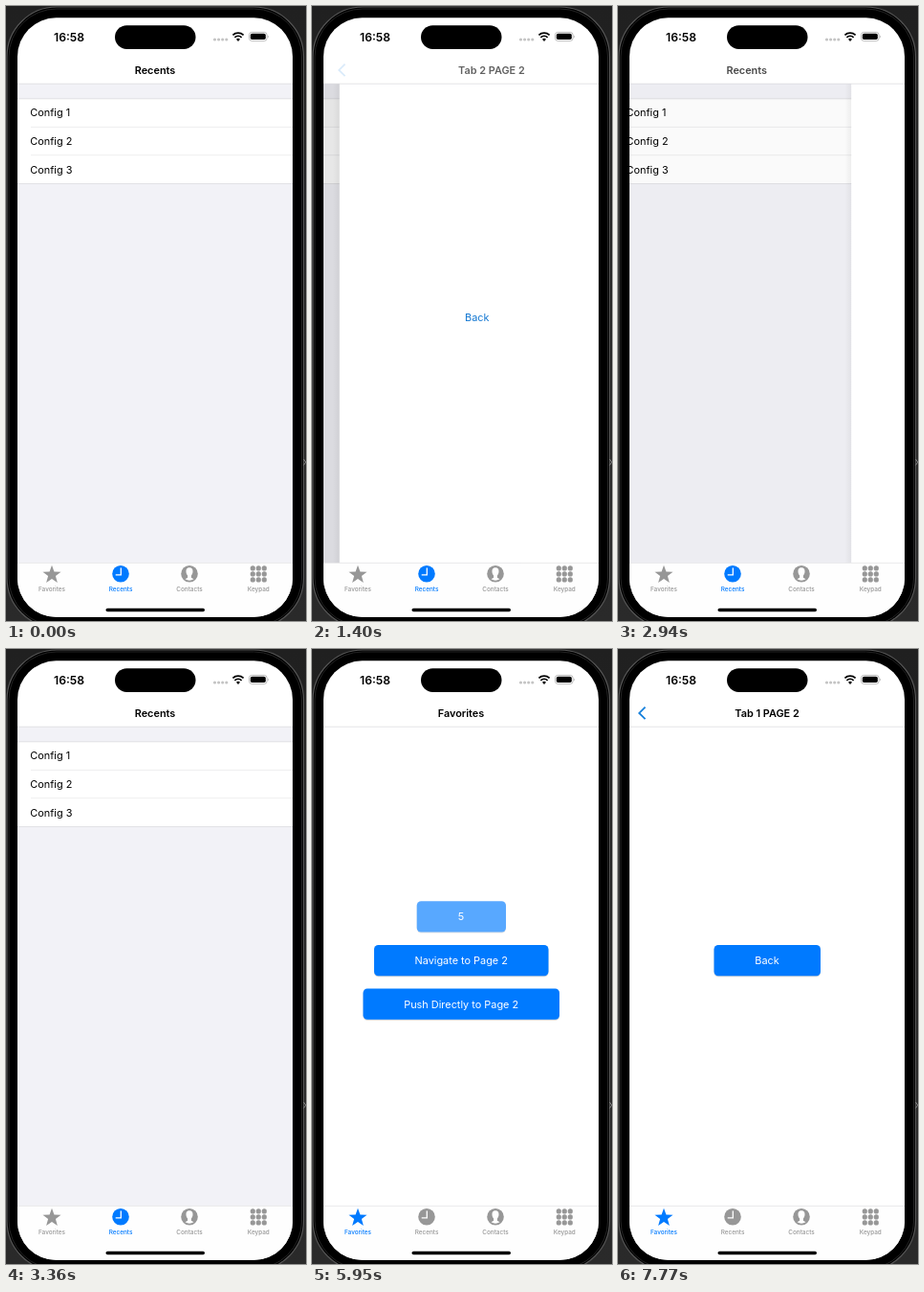
Recreate the animation shown at these times as an HTML page. Size 314 px wide and 642 px high, loop 8 s.

```html
<!DOCTYPE html>
<html lang="en">
<head>
<meta charset="utf-8">
<title>Tab navigation</title>
<style>
html, body { margin: 0; width: 100%; height: 100%; overflow: hidden; background: #242424; }
svg { display: block; width: 314px; height: 642px; }
text { font: 400 10.9px Inter, sans-serif; }
.mid text, text.mid { text-anchor: middle; }
.title { font-weight: 600; }
.clock { font-weight: 600; font-size: 12.2px; }
.tab { fill: #979797; }
.tab text { font-weight: 500; font-size: 6.4px; }
.tab.on { fill: #007aff; }
.button { fill: #007aff; filter: drop-shadow(.5px 1px .7px rgba(0, 0, 0, .16)); }
.button text { fill: #fff; }
.link { fill: #1478d2; }
.line { fill: none; stroke: #dedee1; stroke-width: .8; }
.thin { stroke: #e9e9eb; }
</style>
</head>
<body>
<svg viewBox="0 0 314 642">
  <defs>
    <clipPath id="screen"><rect x="12" y="12.3" width="288" height="625.5" rx="40.4"/></clipPath>
    <clipPath id="content"><rect x="12" y="81" width="288" height="500.5"/></clipPath>
    <linearGradient id="edge">
      <stop offset="0" stop-color="#000" stop-opacity="0"/>
      <stop offset="1" stop-color="#000" stop-opacity=".05"/>
    </linearGradient>
    <linearGradient id="desk" x2="0" y2="1">
      <stop offset="0" stop-color="#202020"/>
      <stop offset="1" stop-color="#2a2a2a"/>
    </linearGradient>
  </defs>

  <!-- device -->
  <rect width="314" height="642" fill="url(#desk)"/>
  <rect x="1" y="1" width="310.5" height="648" rx="52" stroke="#555" stroke-width="1.2"/>
  <rect x="3" y="3" width="306.5" height="644" rx="50" fill="none" stroke="#222"/>
  <path d="M311.5 473l2.2 3.2-2.2 3.2" fill="none" stroke="#888"/>

  <g clip-path="url(#screen)">
    <rect x="12" y="12" width="288" height="626" fill="#fff"/>

    <g clip-path="url(#content)">
      <g id="list">
        <rect x="12" y="81" width="288" height="501" fill="#f2f2f7"/>
        <rect x="12" y="97" width="288" height="88.5" fill="#fff"/>
        <rect id="rowPress" x="12" y="97" width="288" height="29.5" fill="#d1d1d6"/>
        <path class="line" d="M12 96.8h288M12 185.5h288"/>
        <path class="line thin" d="M26 126.4h274M26 155.7h274"/>
        <text x="25.3" y="115.3">Config 1</text>
        <text x="25.3" y="145.1">Config 2</text>
        <text x="25.3" y="174.9">Config 3</text>
      </g>
      <g id="favorites" class="mid">
        <rect x="12" y="81" width="288" height="501" fill="#fff"/>
        <g id="counter" class="button">
          <rect x="109.7" y="263.3" width="93.3" height="32.2" rx="4.5"/>
          <text id="count" x="156" y="283.4">0</text>
        </g>
        <g id="navigate" class="button">
          <rect x="65" y="309" width="182.5" height="32.2" rx="4.5"/>
          <text x="156.2" y="329.1">Navigate to Page 2</text>
        </g>
        <g class="button">
          <rect x="53.5" y="354.5" width="205.5" height="32.2" rx="4.5"/>
          <text x="156.2" y="374.6">Push Directly to Page 2</text>
        </g>
      </g>
      <rect id="dim" x="12" y="81" width="288" height="501"/>
      <g id="detail" class="mid">
        <rect x="5" y="81" width="7" height="501" fill="url(#edge)"/>
        <rect x="12" y="81" width="288" height="501" fill="#fff"/>
        <text id="backLink" class="link" x="156" y="329">Back</text>
        <g id="backButton" class="button">
          <rect x="100.5" y="309" width="111.5" height="32.2" rx="4.5"/>
          <text x="156" y="329">Back</text>
        </g>
      </g>
    </g>

    <!-- navigation bar -->
    <path class="line" d="M12 81.2h288"/>
    <path id="chevron" d="M28.5 60.6l-6.3 6.3 6.3 6.3" fill="none" stroke="#1680dc" stroke-width="1.8"/>
    <text id="rootTitle" class="title mid" x="156" y="70.8">Recents</text>
    <text id="detailTitle" class="title mid" x="156" y="70.8">Tab 2 PAGE 2</text>

    <!-- status bar -->
    <text class="clock" x="50" y="36.6">16:58</text>
    <rect x="114" y="20.2" width="84.5" height="24.8" rx="12.4"/>
    <path d="M218.5 35h14" stroke="#c4c4c4" stroke-width="3.2" stroke-linecap="round" stroke-dasharray="0 4.1"/>
    <path d="M237.4 30.4a8.2 8.2 0 0 1 11.2 0M239.4 32.8a5.2 5.2 0 0 1 7.2 0" fill="none" stroke="#000" stroke-width="1.7"/>
    <path d="M241 34.7a2.9 2.9 0 0 1 4 0l-2 2.2z"/>
    <rect x="254.5" y="27.4" width="18.6" height="9" rx="2.8" fill="none" stroke="#aaa" stroke-width=".8"/>
    <rect x="255.8" y="28.7" width="16" height="6.4" rx="1.8"/>
    <path d="M274.2 30.4q1.7 1.5 0 3z" fill="#aaa"/>

    <!-- tab bar -->
    <rect x="12" y="581.5" width="288" height="57" fill="#fefefe"/>
    <path class="line" d="M12 581.5h288" opacity=".7"/>
    <g class="mid">
      <g id="tabFavorites" class="tab">
        <path id="star"/>
        <text x="48" y="610.6">Favorites</text>
      </g>
      <g id="tabRecents" class="tab">
        <circle cx="120" cy="592.8" r="8.8"/>
        <path d="M120.3 586.6v7.2h-5.6" fill="none" stroke="#fff" stroke-width="1.3"/>
        <text x="120" y="610.6">Recents</text>
      </g>
      <g class="tab">
        <circle cx="192" cy="592.8" r="8.8"/>
        <path d="M192 586.2c-2.6 0-3.7 1.8-3.5 4.4.1 1.8.7 3 1.6 3.9v2.2l-2.6 1.6q4.5 2.7 9 0l-2.6-1.6v-2.2c.9-.9 1.5-2.1 1.6-3.9.2-2.6-.9-4.4-3.5-4.4z" fill="#fff"/>
        <text x="192" y="610.6">Contacts</text>
      </g>
      <g class="tab">
        <g id="keys"></g>
        <text x="264.3" y="610.6">Keypad</text>
      </g>
    </g>
    <rect x="104.5" y="628.8" width="103.5" height="3.4" rx="1.7"/>
  </g>
</svg>
<script>
const LOOP = 8000, STEP = 70, WIDTH = 288;
const PUSH_LIST = 1190, POP_LIST = 2800, SWITCH_TAB = 4270, PUSH_FAVORITES = 7280;
const RELEASES = [5320, 5530, 5670, 5810, 5950, 6300];
const PRESS_ALPHA = { '-1': .42, 0: .65, '-2': .7 };

const $ = id => document.getElementById(id);
const clamp = v => Math.max(0, Math.min(1, v));
const shift = (id, x) => $(id).setAttribute('transform', `translate(${x.toFixed(2)} 0)`);
const fade = (id, a) => $(id).setAttribute('opacity', clamp(a).toFixed(3));
const show = (id, on) => { $(id).style.display = on ? '' : 'none'; };

// Critically damped spring: what remains of the way, from 1 to 0.
function remaining(t, start) {
  if (t <= start) return 1;
  const x = (t - start) * .0217;
  const r = (1 + x) * Math.exp(-x);
  return r < .001 ? 0 : r;
}

// 0 = root page, 1 = detail page
function depthAt(t) {
  if (t >= PUSH_FAVORITES) return 1 - remaining(t, PUSH_FAVORITES);
  if (t >= POP_LIST) return remaining(t, POP_LIST);
  return 1 - remaining(t, PUSH_LIST);
}

function counterAlpha(t) {
  if (t < 5250) return 1;
  for (const offset of [0, -1, -2])
    if (RELEASES.some(r => t === r + offset * STEP)) return PRESS_ALPHA[offset];
  return 1;
}

function render(time) {
  const t = Math.floor(time / STEP) * STEP;
  const favorites = t >= SWITCH_TAB;
  const depth = depthAt(t);
  const left = 1 - depth;
  const lag = Math.sqrt(left);
  const root = favorites ? 'favorites' : 'list';

  show('list', !favorites);
  show('favorites', favorites);
  show('detail', depth > 0);
  show('backLink', !favorites);
  show('backButton', favorites);
  shift(root, -.3 * WIDTH * depth);
  shift('detail', WIDTH * left);
  fade('dim', .1 * depth);

  $('rootTitle').textContent = favorites ? 'Favorites' : 'Recents';
  $('detailTitle').textContent = favorites ? 'Tab 1 PAGE 2' : 'Tab 2 PAGE 2';
  shift('rootTitle', -110 * depth);
  fade('rootTitle', 1 - 1.5 * depth);
  shift('detailTitle', 132 * lag);
  fade('detailTitle', 1 - 1.6 * lag);

  const chevronPress = t < 2660 || favorites ? 1 : t < 2730 ? .5 : .25;
  shift('chevron', Math.min(10, 25 * lag));
  fade('chevron', (1 - 3.5 * lag) * chevronPress);

  fade('rowPress', t < 1050 || t >= POP_LIST ? 0 : t < 1120 ? .5 : left);
  $('count').textContent = RELEASES.filter(r => t >= r).length;
  fade('counter', counterAlpha(t));
  fade('navigate', t < 7140 ? 1 : t < 7210 ? .75 : .42 + .58 * depth);

  $('tabFavorites').classList.toggle('on', favorites);
  $('tabRecents').classList.toggle('on', !favorites);
}

const starPoints = Array.from({ length: 10 }, (_, i) => {
  const r = i % 2 ? 4.1 : 10, a = i * Math.PI / 5;
  return `${(48 + r * Math.sin(a)).toFixed(2)} ${(593.8 - r * Math.cos(a)).toFixed(2)}`;
});
$('star').setAttribute('d', `M${starPoints.join('L')}z`);

for (let i = 0; i < 9; i++) {
  const dot = document.createElementNS('http://www.w3.org/2000/svg', 'circle');
  dot.setAttribute('cx', 258.3 + i % 3 * 6);
  dot.setAttribute('cy', 586.9 + Math.floor(i / 3) * 6);
  dot.setAttribute('r', 2.6);
  $('keys').append(dot);
}

function frame() {
  render(performance.now() % LOOP);
  requestAnimationFrame(frame);
}
frame();
</script>
</body>
</html>
```
